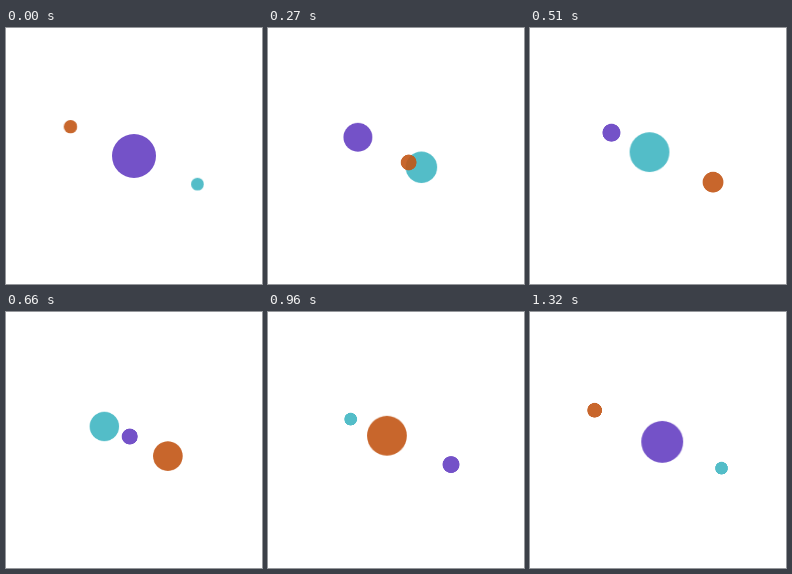
Recreate the animation shown at these times as an HTML page. Size 256 by 256 pixels, loop 1.35 s.

```html
<!DOCTYPE html>
<html lang="en">
<head>
<meta charset="utf-8">
<title>Orbiting dots</title>
<style>
  html, body { margin: 0; height: 100%; overflow: hidden; background: #fff; }
  svg { display: block; width: 100vw; height: 100vh; }

  /* 15 ticks of 30 ms per third of the loop */
  circle {
    opacity: .9;
    transform-origin: 0 0;
    animation: 1350ms steps(15) -2ms infinite;
  }
  .purple { fill: #6540c2; animation-name: purple; }
  .teal   { fill: #41b6c2; animation-name: teal; }
  .orange { fill: #c25616; animation-name: orange; }

  /* unit circles: scale is the radius */
  @keyframes purple {
    0%, 100% { transform: translate(128px, 128px) scale(22); }
    33.3333% { transform: translate(64.5px, 96.8px) scale(9.4); }
    66.6667% { transform: translate(191.5px, 156.3px) scale(6.4); }
  }
  @keyframes teal {
    0%       { transform: translate(191.5px, 156.2px) scale(6.4); }
    33.3333% { transform: translate(128px, 128px) scale(22); }
    66.6667% { transform: translate(64.5px, 99px) scale(6.4); animation-timing-function: steps(14); }
    97.7778%, 100% { transform: translate(191.5px, 156.2px) scale(6.4); }
  }
  @keyframes orange {
    0%       { transform: translate(64.5px, 98.8px) scale(6.8); }
    33.3333% { transform: translate(191.5px, 158.2px) scale(8.6); }
    66.6667% { transform: translate(128px, 128px) scale(22); animation-timing-function: steps(14); }
    97.7778%, 100% { transform: translate(64.6px, 98.3px) scale(7.4); }
  }
</style>
</head>
<body>
<svg viewBox="0 0 256 256">
  <circle class="purple" r="1"/>
  <circle class="teal" r="1"/>
  <circle class="orange" r="1"/>
</svg>
</body>
</html>
```
